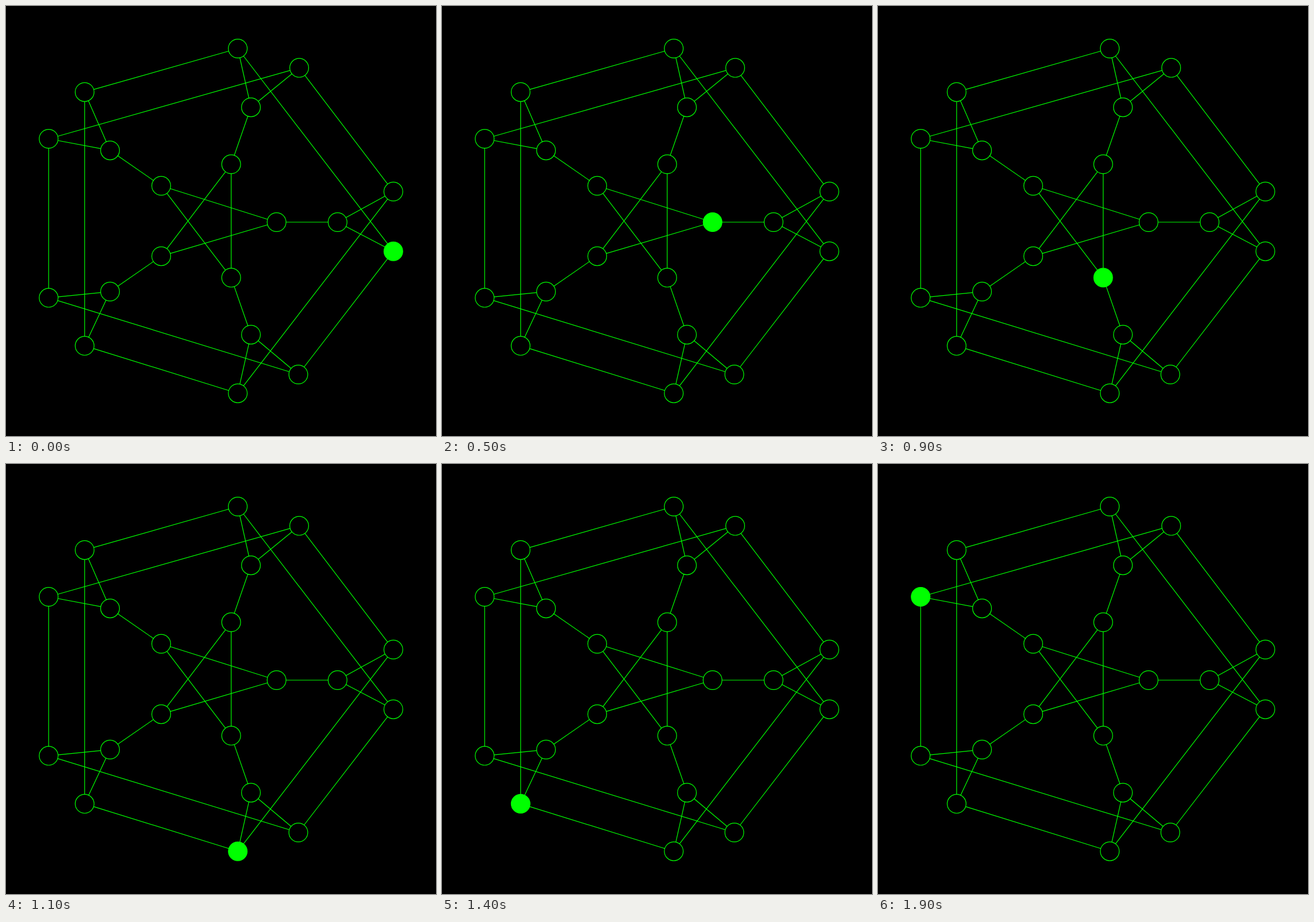
Recreate the animation shown at these times as an HTML page. Size 748 by 748 pixels, loop 2000 ms.

```html
<!DOCTYPE html>
<html lang="en">
<head>
<meta charset="utf-8">
<title>Graph traversal</title>
<style>
  html, body { margin: 0; width: 100%; height: 100%; overflow: hidden; background: #000; }
  svg { display: block; width: 100%; height: 100%; }
  line, circle { stroke: #0f0; stroke-width: 1.2; }
</style>
</head>
<body>
<svg id="stage" viewBox="0 0 748 748"></svg>
<script>
const STEP = 100;
const RADIUS = 16.4;

const nodes = {
  A: [403.2, 74], B: [510, 107.6], C: [426.1, 176.2], D: [391.7, 275.3],
  E: [673.8, 322.8], F: [673.8, 426.7], G: [576.8, 376], H: [470.7, 376],
  I: [508.5, 641], J: [403.2, 673.7], K: [426.1, 571.7], L: [391.7, 472.6],
  M: [74.2, 507.6], N: [136.8, 591.1], O: [181, 496.8], P: [270, 435.2],
  Q: [74.2, 231], R: [136.8, 149.7], S: [181, 251.2], T: [270, 312.8]
};

// Each string is a path through adjacent nodes.
const paths = [
  'FARNJEBQMIF', 'HTLDPH',
  'EGF', 'ACB', 'QSR', 'MON', 'IKJ',
  'GH', 'CD', 'ST', 'OP', 'KL'
];

const visits = 'FIAGCHPDTLKJMONEBRSQ';

const stage = document.getElementById('stage');

function add(tag, attrs) {
  const el = document.createElementNS('http://www.w3.org/2000/svg', tag);
  for (const key in attrs) el.setAttribute(key, attrs[key]);
  return stage.appendChild(el);
}

for (const path of paths) {
  for (let i = 1; i < path.length; i++) {
    const [x1, y1] = nodes[path[i - 1]];
    const [x2, y2] = nodes[path[i]];
    add('line', { x1, y1, x2, y2 });
  }
}

const dots = {};
for (const id in nodes) {
  const [cx, cy] = nodes[id];
  dots[id] = add('circle', { cx, cy, r: RADIUS, fill: '#000' });
}

function draw(time) {
  const active = visits[Math.floor(time / STEP) % visits.length];
  for (const id in dots) {
    dots[id].setAttribute('fill', id === active ? '#0f0' : '#000');
  }
}

const start = performance.now();
function tick() {
  draw(performance.now() - start);
  requestAnimationFrame(tick);
}
draw(0);
requestAnimationFrame(tick);
</script>
</body>
</html>
```
